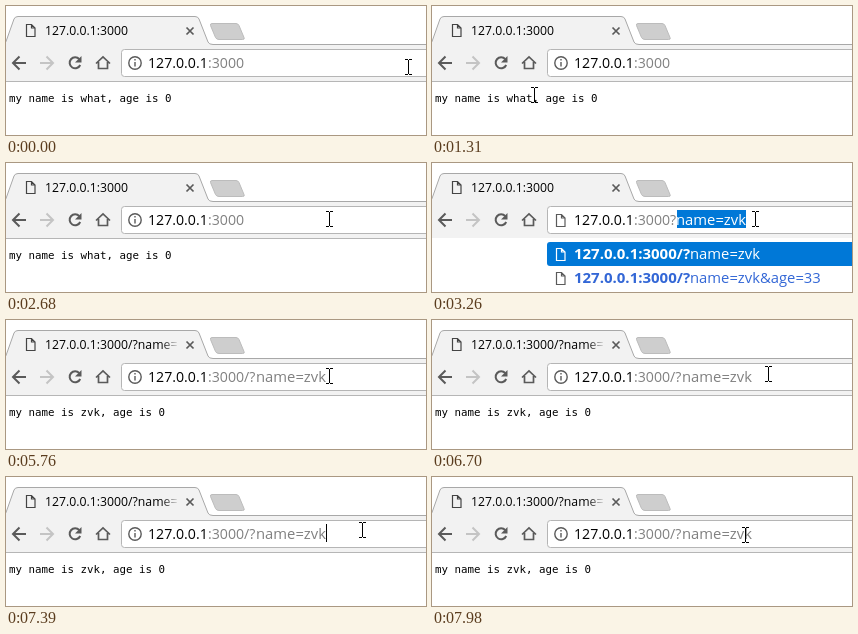
These frames come from a looping animation (420x129 px, 8 s). An HTML page:

```html
<!DOCTYPE html>
<html lang="en">
<head>
<meta charset="utf-8">
<title>Query string demo</title>
<style>
html, body { margin: 0; width: 100%; height: 100%; overflow: hidden; background: #fff; }
svg { display: block; }
text { font: 14.15px "Open Sans", "Noto Sans", sans-serif; white-space: pre; }
.tab { font-size: 12.25px; }
.page { font: 10.8px "DejaVu Sans Mono", monospace; }
.param { font-size: 14.8px; }
.bold { font-size: 15px; font-weight: 700; }
.line { fill: none; stroke: #5a5a5a; stroke-width: 2; }
.thin { stroke-width: 1.7; }
.pale { stroke: #c4c4c4; }
#host { fill: #000; }
#port, #params { fill: #808080; }
.selected #host, .selected #port, .selected #params, .typing #params { fill: #fff; }
</style>
</head>
<body>
<svg id="stage" width="420" height="129" viewBox="0 0 420 129">
  <defs>
    <linearGradient id="fade" gradientUnits="userSpaceOnUse" x1="155" x2="174">
      <stop/><stop offset="1" stop-opacity="0"/>
    </linearGradient>
    <path id="doc" d="M.5 .5h5l3.500 3.500v8.500h-8.500zM5.500 .5v3.500h3.500" fill="none" stroke-width="1.2"/>
  </defs>

  <rect width="420" height="129" fill="#fff"/>
  <rect y="39" width="420" height="36" fill="#f2f2f2"/>
  <path d="M-3 38.500Q-1 38 0 35.500L8 13Q9 10.500 12 10.500H189Q192 10.500 193 13L202 36Q203 38.500 207 38.500H421V40H-3Z" fill="#f2f2f2"/>
  <path d="M-3 38.500Q-1 38 0 35.500L8 13Q9 10.500 12 10.500H189Q192 10.500 193 13L202 36Q203 38.500 207 38.500H421" fill="none" stroke="#a8a8a8"/>
  <path d="M206 17.500H230Q232 17.500 233 19.500L238 31.500Q239 33.500 236.500 33.500H213Q210.500 33.500 209.500 31.500L204.500 19.500Q204 17.500 206 17.500Z" fill="#cecece" stroke="#bcbcbc"/>
  <use href="#doc" x="20" y="18" stroke="#444"/>
  <text id="title" class="tab" x="39" y="29" fill="url(#fade)"></text>
  <path d="M180.500 21.500l7 7m0-7l-7 7" class="line thin"/>

  <path d="M20 57H7.500M13.500 50.500L7 57L13.500 63.500" class="line"/>
  <path d="M34 57H46.500M40.500 50.500L47 57L40.500 63.500" class="line pale"/>
  <path d="M73.300 53.200A5.500 5.500 0 1 0 74.200 59" class="line"/>
  <path d="M75.500 50v6.500H69z" fill="#5a5a5a"/>
  <path d="M90 57.500L97 51L104 57.500M92.500 56V62.500H101.500V56" class="line thin"/>

  <rect x="115.500" y="43.500" width="320" height="27" rx="3" fill="#fff" stroke="#b5b5b5"/>
  <path d="M0 75.500H420" stroke="#b6b6b6"/>
  <g id="info" fill="none" stroke="#5a5a5a" stroke-width="1.4">
    <circle cx="129" cy="57" r="6.200"/><path d="M129 56v4.500M129 53v1.600"/>
  </g>
  <use id="file" href="#doc" x="124" y="51" stroke="#5a5a5a"/>
  <rect id="selection" y="47" height="18" fill="#0078d7"/>
  <text y="62"><tspan id="host" x="142">127.0.0.1</tspan><tspan id="port" x="202"></tspan><tspan id="params" class="param"></tspan></text>
  <rect id="caret" y="47" width="1" height="18"/>

  <text id="body" class="page" x="3" y="96"></text>
  <g id="menu">
    <rect y="75" width="420" height="54" fill="#fff"/>
    <rect x="115" y="79" width="320" height="24" rx="3" fill="#0078d7"/>
    <use href="#doc" x="124" y="85" stroke="#fff"/>
    <use href="#doc" x="124" y="109" stroke="#5a5a5a"/>
    <text y="96" fill="#fff"><tspan class="bold" x="142">127.0.0.1:3000/?</tspan><tspan class="param" x="258">name=zvk</tspan></text>
    <text y="120" fill="#3367d6"><tspan class="bold" x="142">127.0.0.1:3000/?</tspan><tspan class="param" x="258">name=zvk&amp;age=33</tspan></text>
  </g>

  <path id="beam" d="M0 .5h3m1 0h3M3.500 1v14M0 15.500h3m1 0h3" fill="none" stroke="#000" shape-rendering="crispEdges"/>
  <path id="arrow" d="M.5 .5v16l3.700-3.600 2.600 5.600 2.300-1-2.600-5.500h5z" fill="#fff" stroke="#000"/>
</svg>
<script>
const LOOP = 8000;
const $ = id => document.getElementById(id);
const show = (id, on) => $(id).setAttribute('visibility', on ? 'visible' : 'hidden');
const within = (t, from, to) => t >= from && t < to;

// Pointer: start time, left, top, arrow shape
const pointer = [
  [0, 399, 53], [150, 216, 78, 1], [300, 135, 79, 1], [580, 107, 82, 1],
  [730, 74, 81], [880, 71, 81], [1310, 99, 81],
  [1460, 132, 86, 1], [1580, 180, 82, 1], [1700, 226, 77, 1], [1820, 262, 56],
  [1940, 272, 51], [2090, 320, 48], [6700, 333, 46], [6850, 345, 45],
  [6970, 348, 45], [7120, 351, 45], [7270, 353, 45], [7980, 310, 50]
];

function draw(t) {
  const typing = within(t, 3260, 5760);
  const loaded = t >= 5760;
  const selected = within(t, 1940, 2090) || within(t, 6970, 7270);

  $('stage').setAttribute('class', typing ? 'typing' : selected ? 'selected' : '');
  $('title').textContent = '127.0.0.1:3000' + (loaded ? '/?name=' : '');
  $('port').textContent = ':3000' + (typing ? '?' : loaded ? '/?' : '');
  $('params').textContent = typing || loaded ? 'name=zvk' : '';
  $('params').setAttribute('x', typing ? 244 : 250);
  $('body').textContent = `my name is ${loaded ? 'zvk' : 'what'}, age is 0`;

  const [left, right] = typing ? [245, 314] : [142, loaded ? 320 : 238];
  $('selection').setAttribute('x', left);
  $('selection').setAttribute('width', right - left);
  show('selection', typing || selected);
  $('caret').setAttribute('x', right);
  show('caret', within(t, 2090, 2680) || within(t, 7270, 7830));
  show('menu', typing);
  show('file', typing);
  show('info', !typing);

  const [, x, y, arrow] = pointer.findLast(p => p[0] <= t);
  for (const id of ['beam', 'arrow']) $(id).setAttribute('transform', `translate(${x} ${y})`);
  show('arrow', arrow);
  show('beam', !arrow);
}

const start = performance.now();
function tick() {
  draw((performance.now() - start) % LOOP);
  requestAnimationFrame(tick);
}
tick();
</script>
</body>
</html>
```
